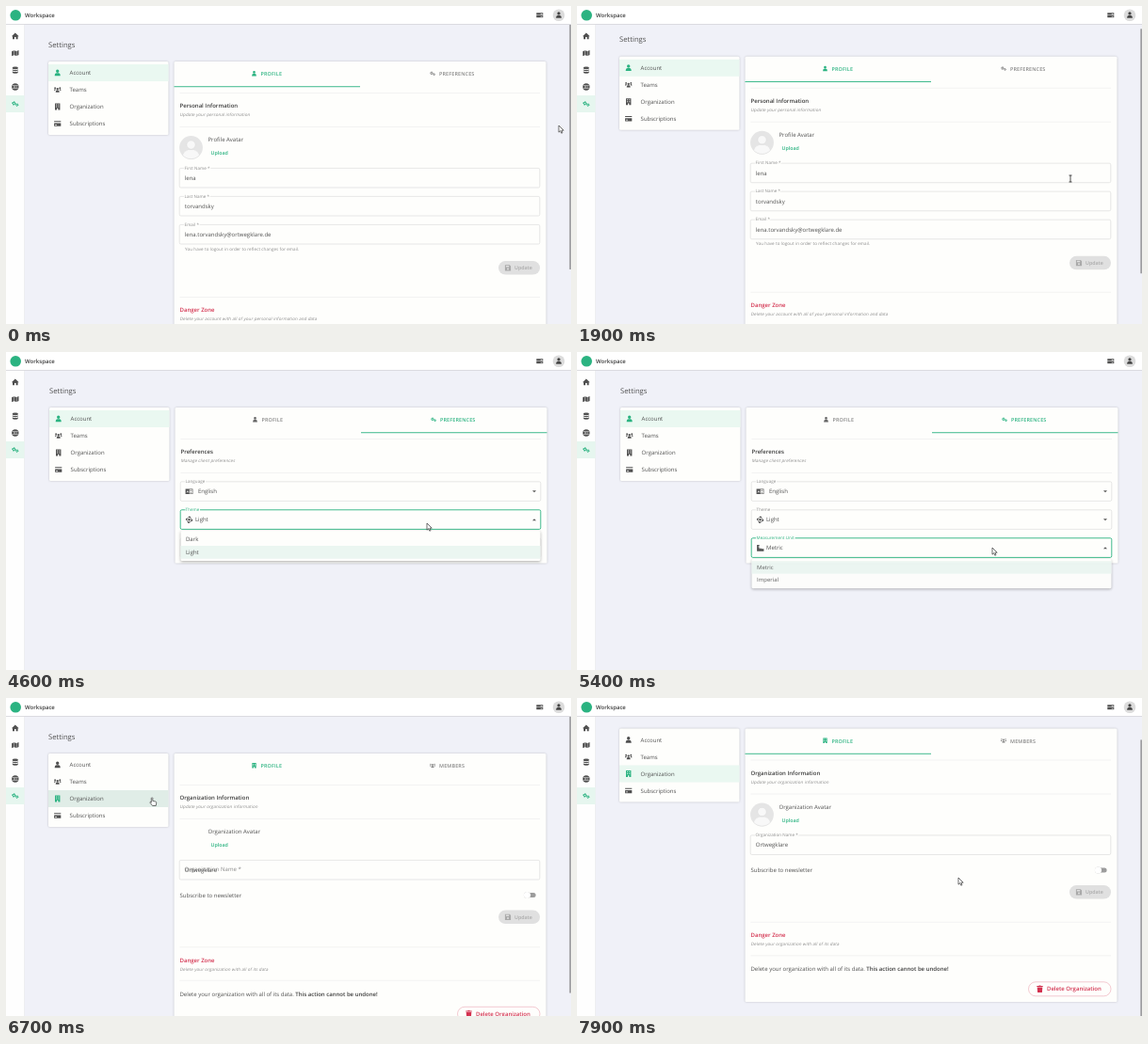
Animation of 600x338 px, one loop 8 s. Source, as an HTML page:

```html
<!DOCTYPE html>
<html lang="en">
<head>
<meta charset="utf-8">
<title>Settings</title>
<style>
  html, body { margin: 0; width: 100%; height: 100%; overflow: hidden; background: #f0f1f8; }
  svg { display: block; width: 600px; height: 338px; }
  text { font: 6px "Open Sans", "Noto Sans", sans-serif; fill: #505050; text-rendering: geometricPrecision; white-space: pre; }
  .heading { font-size: 7.7px; }
  .bold { font-weight: 600; fill: #3c3c3c; }
  .small { font-size: 4.5px; fill: #8a8a8a; letter-spacing: .02em; }
  .label { font-size: 4.5px; fill: #8a8a8a; letter-spacing: .01em; stroke: #fefefc; stroke-width: 2px; paint-order: stroke; }
  .tab { font-size: 5.4px; font-weight: 600; letter-spacing: .03em; }
  .action { font-size: 5.3px; font-weight: 600; }
  .red { fill: #d3314f; font-weight: 600; }
  .card { fill: #fefefc; filter: drop-shadow(0 .7px 1px #0003); }
  .popup { fill: #fefefc; filter: drop-shadow(0 1.5px 1.8px #0005); }
  .rule { stroke: #e4e4e6; stroke-width: .5; }
  .box { fill: none; stroke: #cfcfcf; stroke-width: .5; }
  .focus .box { stroke: #2bb381; stroke-width: .9; }
  .focus .label, .tint .label { fill: #2bb381; }
  .cursor path { fill: #fff; stroke: #333; stroke-width: .7; stroke-linejoin: round; }
</style>
</head>
<body>
<svg id="stage" viewBox="0 0 600 338"></svg>
<script>
const GREEN = '#2bb381', GREY = '#505050', MUTED = '#858585', RED = '#d3314f', DISABLED = '#a9a9a9';
const LOOP = 8000, STEP = 100, VIEW = 318;

// Icons are centred on 0,0 and about 7 units wide
const dot = (x, y, r) => `M${x - r} ${y}a${r} ${r} 0 1 0 ${2 * r} 0a${r} ${r} 0 1 0 ${-2 * r} 0z`;
const gear = (x, y, r) => Array.from({ length: 16 }, (_, i) => {
  const a = i * Math.PI / 8, d = r * (i % 4 < 2 ? 1.15 : .85);
  return (i ? 'L' : 'M') + (x + d * Math.cos(a)).toFixed(2) + ' ' + (y + d * Math.sin(a)).toFixed(2);
}).join('') + 'z' + dot(x, y, r * .4);
const icons = {
  user: dot(0, -1.7, 1.7) + 'M-3 3.3q0-3 2-3h2q2 0 2 3z',
  users: dot(0, -.9, 1.2) + dot(-2.6, -1.8, .9) + dot(2.6, -1.8, .9) +
    'M-2 2.8q0-2.3 1.3-2.3h1.4q1.3 0 1.3 2.3zM-3.8.8q0-1.5 1-1.5h.9l-.5 1.5zM3.8.8q0-1.5-1-1.5h-.9l.5 1.5z',
  building: 'M-2.7-3.5h5.4v7H.7V1.8H-.7v1.7h-2zM-1.6-2.4v1h1v-1zM.6-2.4v1h1v-1zM-1.6-.4v1h1v-1zM.6-.4v1h1v-1z',
  card: 'M-3.6-2.7h7.2v1h-7.2zM-3.6-.4h7.2v3.1h-7.2zM-2.7 1.1v.6h2v-.6z',
  cogs: gear(-1.4, -.6, 1.9) + gear(1.9, 1.1, 1.5),
  home: 'M-3.9.2 0-3.4 3.9.2H2.8v3H.8V1H-.8v2.2h-2V.2z',
  map: 'M-3.7-1.8l2.2-1v5l-2.2 1zM-1.1-2.8 1.1-1.9v5l-2.2-.9zM1.5-1.9l2.2-1v5l-2.2 1z',
  database: 'M-3-2.4q0-1.2 3-1.2t3 1.2v.6q0 1-3 1t-3-1zM-3-.6q3 1.2 6 0v1.2q-3 1.3-6 0zM-3 1.5q3 1.2 6 0v1q0 1.2-3 1.2t-3-1.2z',
  globe: dot(0, 0, 3.7) + 'M-3-1.4h6v.5h-6zM-3 .9h6v.5h-6zM-.25-.8h.5V.8h-.5zM-1.6-.8h.5V.8h-.5zM1.1-.8h.5V.8h-.5z',
  server: 'M-3.5-2.5h7v2.1h-7zM1-1.7v.6h1.6v-.6zM-3.5.3h7v2.1h-7zM1 1v.6h1.6V1z',
  save: 'M-3.1-3.1h4.9l1.3 1.3v4.9h-6.2zM-2.1-2.2v1.5h3.3v-1.5z' + dot(0, 1.2, 1),
  trash: 'M-3.2-3.2h2l.4-.6h1.6l.4.6h2v.9h-6.4zM-2.8-1.7h5.6l-.4 5.4h-4.8z',
  language: 'M-3.9-2.7h7.8v5.4h-7.8zM.2-2.1v4.2h3.1v-4.2zM-2.9 1.2h.6l.4-.8h.8l.3.8h.4L-1.6-1.4zM.8-.9h1.9v.5H.8zM1 .6h1.5v.5H1z',
  light: gear(0, 0, 3.2) + dot(0, 0, 2.2),
  ruler: 'M-3.4-3.4h2.5v1h-1v.5h1v1h-1v.5h1V1h.5v-.9h.5V1h.5V.1h.5V1h2.8v2.5h-7.3z',
};
const icon = (name, x, y, color = GREY, k = 1) =>
  `<path d="${icons[name]}" fill="${color}" fill-rule="evenodd" transform="translate(${x} ${y}) scale(${k})"/>`;
const text = (x, y, s, cls = '', extra = '') => `<text x="${x}" y="${y}" class="${cls}" ${extra}>${s}</text>`;
const caption = (y, s) => text(0, 0, s, 'small', `transform="translate(184.5 ${y}) skewX(-11)"`);
const rect = (x, y, w, h, attrs) => `<rect x="${x}" y="${y}" width="${w}" height="${h}" ${attrs}/>`;
const rule = y => `<path class="rule" d="M184.5 ${y}H567"/>`;

const sideMenu = selected => text(45, 43.6, 'Settings', 'heading') + rect(45, 59, 127.5, 78, 'rx="1.5" class="card"') +
  [['user', 'Account'], ['users', 'Teams'], ['building', 'Organization'], ['card', 'Subscriptions']].map(([name, label], i) => {
    const y = 71 + 18 * i, on = label === selected;
    const hover = label === 'Organization' ? rect(45, y - 9, 127.5, 18, 'class="hover" fill="#000" opacity="0"') : '';
    return (on ? rect(45, y - 9, 127.5, 18, 'fill="#eaf8f1"') : '') + hover +
      icon(name, 54.7, y, on ? GREEN : GREY) + text(67.6, y + 2.1, label);
  }).join('');

const tabs = (height, first, second, active) => rect(178.5, 59, 395, height, 'rx="1.5" class="card"') +
  [[263.5, 270.5, ...first], [453, 460, ...second]].map(([ix, tx, name, label], i) => {
    const color = i === active ? GREEN : MUTED;
    return icon(name, ix, 71.8, i || name === 'building' ? color : (color === MUTED ? '#666' : color), .8) +
      text(tx, 74.4, label, 'tab', `style="fill:${color}"`);
  }).join('') + rect(178.5, 85.3, 197.5, .9, `class="ink" fill="${GREEN}"`) + rule(92.5);

const section = (title, note) => text(184.5, 108, title, 'bold') + caption(117, note) + rule(128.5);

const avatar = `<g class="avatar" transform="translate(196.5 150.5)"><circle r="12.4" fill="#e5e5e5"/>
  <path d="M-9 8q1-4.5 6-5.8h6q5 1.3 6 5.8A12 12 0 0 1-9 8z${dot(0, -3, 4.6)}" fill="#f8f8f8" stroke="#d6d6d6" stroke-width=".4"/></g>`;
const avatarRow = label => avatar + text(214.5, 144.2, label) +
  text(217.5, 158.2, 'Upload', 'action', `style="fill:${GREEN}"`);

const box = y => rect(184.2, y, 382.6, 20.6, 'rx="1.5" class="box"');
const field = (y, label, value) => box(y) + text(189.6, y + 1.2, label, 'label') + text(189.8, y + 12.4, value);

const updateButton = y => rect(523, y, 44, 14.6, 'rx="7.3" fill="#e0e0e0"') +
  icon('save', 533, y + 7.3, DISABLED) + text(540, y + 9.2, 'Update', 'action', `style="fill:${DISABLED}"`);

const dangerZone = (y, thing, note, buttonX) => rule(y - 13.5) + text(184.5, y + 2.2, 'Danger Zone', 'red') +
  caption(y + 11.2, note) + rule(y + 22) +
  text(184.5, y + 38.4, `Delete your ${thing}. <tspan class="bold">This action cannot be undone!</tspan>`) +
  rect(buttonX, y + 50, 567 - buttonX, 15, `rx="7.5" fill="none" stroke="${RED}" stroke-opacity=".5" stroke-width=".5"`) +
  icon('trash', buttonX + 12, y + 57.5, RED) +
  text(buttonX + 19.5, y + 59.6, thing[0] === 'a' ? 'Delete Account' : 'Delete Organization', 'red');

const select = (y, label, name, value, tx) => `<g class="select">${box(y)}${text(189.6, y + 1.2, label, 'label')}
  ${icon(name, 193.5, y + 10.5)}${text(tx, y + 12.6, value)}
  <path class="arrow" d="M-2-1h4L0 1z" fill="#555" transform="translate(560 ${y + 10.5})"/></g>`;
const popup = (y, items, selected) => `<g class="menu" data-y="${y}">${rect(184.5, y, 382, 32, 'rx="1.5" class="popup"')}
  ${items.map((s, i) => (i === selected ? rect(184.5, y + 2.3 + 13.7 * i, 382, 13.7, 'fill="#ebf6f1"') : '') +
    text(190, y + 11.2 + 13.8 * i, s)).join('')}</g>`;

const profilePage = sideMenu('Account') + tabs(335, ['user', 'PROFILE'], ['cogs', 'PREFERENCES'], 0) +
  section('Personal Information', 'Update your personal information') + avatarRow('Profile Avatar') +
  field(172.4, 'First Name *', 'lena') + field(202.4, 'Last Name *', 'torvandsky') +
  field(232.4, 'Email *', 'lena.torvandsky@ortwegklare.de') +
  text(190, 259.7, 'You have to logout in order to reflect changes for email.', 'small') + updateButton(271) +
  dangerZone(323, 'account with all personal data', 'Delete your account with all of your personal information and data', 493.5);

const preferencesPage = sideMenu('Account') + tabs(165.5, ['user', 'PROFILE'], ['cogs', 'PREFERENCES'], 1) +
  section('Preferences', 'Manage client preferences') +
  select(137.8, 'Language', 'language', 'English', 203) +
  select(167.8, 'Theme', 'light', 'Light', 200) +
  select(197.8, 'Measurement Unit', 'ruler', 'Metric', 200) +
  popup(160, ['English', 'Deutsch'], 0) + popup(190, ['Dark', 'Light'], 1) + popup(220, ['Metric', 'Imperial'], 0);

const organizationPage = sideMenu('Organization') + tabs(290.5, ['building', 'PROFILE'], ['users', 'MEMBERS'], 0) +
  section('Organization Information', 'Update your organization information') + avatarRow('Organization Avatar') +
  box(172.4) + text(189.6, 173.6, 'Organization Name *', 'label', 'id="nameLabel"') + text(189.8, 184.8, 'Ortwegklare') +
  text(184.5, 211.7, 'Subscribe to newsletter') + rect(552, 207, 10.6, 5, 'rx="2.5" fill="#9c9c9c"') +
  '<circle cx="553.5" cy="209.5" r="3.6" fill="#fff" style="filter:drop-shadow(0 .3px .5px #0004)"/>' +
  updateButton(225.5) +
  dangerZone(278.3, 'organization with all of its data', 'Delete your organization with all of its data', 479.5);

const frame = rect(0, 19.5, 19.7, 319, 'fill="#fefefe"') + rect(19.5, 19.5, .5, 319, 'fill="#e2e2e6"') +
  rect(0, 95, 19.5, 18, 'fill="#e6f6ef"') +
  ['home', 'map', 'database', 'globe', 'cogs'].map((name, i) => icon(name, 9.8, 32 + 18 * i, i === 4 ? GREEN : GREY)).join('') +
  rect(0, 0, 600, 19.4, 'fill="#fff"') + rect(0, 19.3, 600, .6, 'fill="#c9c9ce"') +
  `<circle cx="10.2" cy="9.8" r="5.8" fill="${GREEN}"/>` + text(20, 11.9, 'Workspace', 'bold') + icon('server', 566.8, 9.8) +
  '<circle cx="587" cy="9.8" r="6.3" fill="#dcdcdc"/>' + icon('user', 587, 9.6, '#444', .95);

const cursors = {
  arrow: '<path d="M0 0v7.2l1.7-1.5 1.1 2.5 1.2-.5-1.1-2.5h2.3z"/>',
  beam: '<path d="M-1.5-1H1.5M0-1v7M-1.5 6H1.5" style="fill:none;stroke:#222;stroke-width:.8"/>',
  hand: '<path d="M-.3 0q.8-.5 1.1.4v3l3 .7q1 .3.9 1.4l-.5 3H.6L-2 5.3q-.3-1 .7-.8l.6.6V.5z"/>',
};

const stage = document.getElementById('stage');
stage.innerHTML = [profilePage, preferencesPage, organizationPage].map(s => `<g class="page">${s}</g>`).join('') +
  rect(598.3, 20, 1.7, 100, 'id="thumb" fill="#9d9da0"') + frame +
  '<g class="cursor">' + Object.entries(cursors).map(([k, s]) => `<g data-shape="${k}">${s}</g>`).join('') + '</g>';

const all = (q, root = stage) => [...root.querySelectorAll(q)];
const pages = all('.page'), selects = all('.select'), menus = all('.menu'), shapes = all('[data-shape]');
const [thumb, nameLabel, pointer] = ['#thumb', '#nameLabel', '.cursor'].map(q => stage.querySelector(q));
const inks = pages.map(p => p.querySelector('.ink')), hovers = pages.map(p => p.querySelector('.hover'));
const orgAvatar = pages[2].querySelector('.avatar');

const ramp = (t, a, b) => {
  const p = Math.min(1, Math.max(0, (t - a) / (b - a)));
  return p * p * (3 - 2 * p);
};
const show = (el, on) => el.setAttribute('visibility', on ? 'inherit' : 'hidden');
const latest = (list, t) => list.filter(k => k[0] <= t).pop();

// time, x, y
const path = [[0, 587, 127], [100, 587, 127], [600, 524, 181], [2200, 524, 181], [2500, 479, 71], [2600, 479, 71],
  [2900, 456.5, 130.5], [3200, 456.5, 130.5], [3400, 452, 146], [3550, 452, 146], [3700, 450, 169], [3900, 447, 182],
  [4600, 447, 182], [4900, 444, 210], [5000, 444, 210], [5200, 441, 208], [5400, 441, 208], [5650, 438, 229],
  [5750, 438, 229], [6300, 155, 106], [6900, 155, 106], [7300, 405, 191], [LOOP, 405, 191]];
const shapeTimes = [[0, 'arrow'], [500, 'beam'], [2300, 'arrow'], [2400, 'hand'], [2700, 'arrow'], [3300, 'hand'],
  [3500, 'arrow'], [3900, 'hand'], [4300, 'arrow'], [5100, 'hand'], [5300, 'arrow'], [6200, 'hand'], [7000, 'arrow']];
const pageTimes = [[0, 0], [2550, 1], [6550, 2]];
const openTimes = [[3400, 3720], [4200, 4950], [5200, 5750]];
const focusTimes = [[3400, 4200], [4200, 5200], [5200, 6250]];
const maxScroll = [71, 0, 26.5];

function draw(t) {
  const page = latest(pageTimes, t)[1];
  const scroll = 71 * (ramp(t, 500, 1100) - ramp(t, 1400, 2000)) + 26.5 * ramp(t, 7300, 7800);
  pages.forEach((p, i) => show(p, i === page));
  pages[page].setAttribute('transform', `translate(${page === 1 ? 1 : 0} ${-scroll})`);

  const ratio = VIEW / (VIEW + maxScroll[page]);
  show(thumb, page !== 1);
  thumb.setAttribute('y', 20 + scroll * ratio);
  thumb.setAttribute('height', VIEW * ratio);

  inks[1].setAttribute('x', 178.5 + 197.5 * ramp(t, 2500, 2800));
  hovers[1].setAttribute('opacity', t >= 6200 ? .035 : 0);
  hovers[2].setAttribute('opacity', t < 7000 ? .045 : 0);

  selects.forEach((s, i) => {
    const [from, to] = focusTimes[i], [open, close] = openTimes[i];
    s.classList.toggle('focus', t >= from && t < to);
    s.classList.toggle('tint', i > 0 && t >= 6250);
    const flip = t >= open && t < close ? -1 : 1;
    s.querySelector('.arrow').setAttribute('transform', `translate(560 ${148.3 + 30 * i}) scale(1 ${flip})`);
    const level = Math.min(ramp(t, open, open + 250), 1 - ramp(t, close, close + 200));
    const y = +menus[i].dataset.y, k = .75 + .25 * level;
    menus[i].setAttribute('opacity', level);
    menus[i].setAttribute('transform', `translate(0 ${y * (1 - k)}) scale(1 ${k})`);
  });

  // Organization data arrives shortly after the page opens
  const loaded = t >= 6850;
  show(inks[2], loaded && page === 2);
  show(orgAvatar, loaded && page === 2);
  nameLabel.setAttribute('y', loaded ? 173.6 : 184.4);
  nameLabel.style.fontSize = loaded ? '' : '6px';

  const i = Math.max(1, path.findIndex(k => k[0] > t));
  const [a, b] = [path[i - 1], path[i]], p = ramp(t, a[0], b[0]);
  pointer.setAttribute('transform', `translate(${a[1] + (b[1] - a[1]) * p} ${a[2] + (b[2] - a[2]) * p})`);
  const shape = latest(shapeTimes, t)[1];
  shapes.forEach(s => show(s, s.dataset.shape === shape));
}

function tick() {
  draw(Math.floor(performance.now() % LOOP / STEP) * STEP);
  requestAnimationFrame(tick);
}
tick();
</script>
</body>
</html>
```
